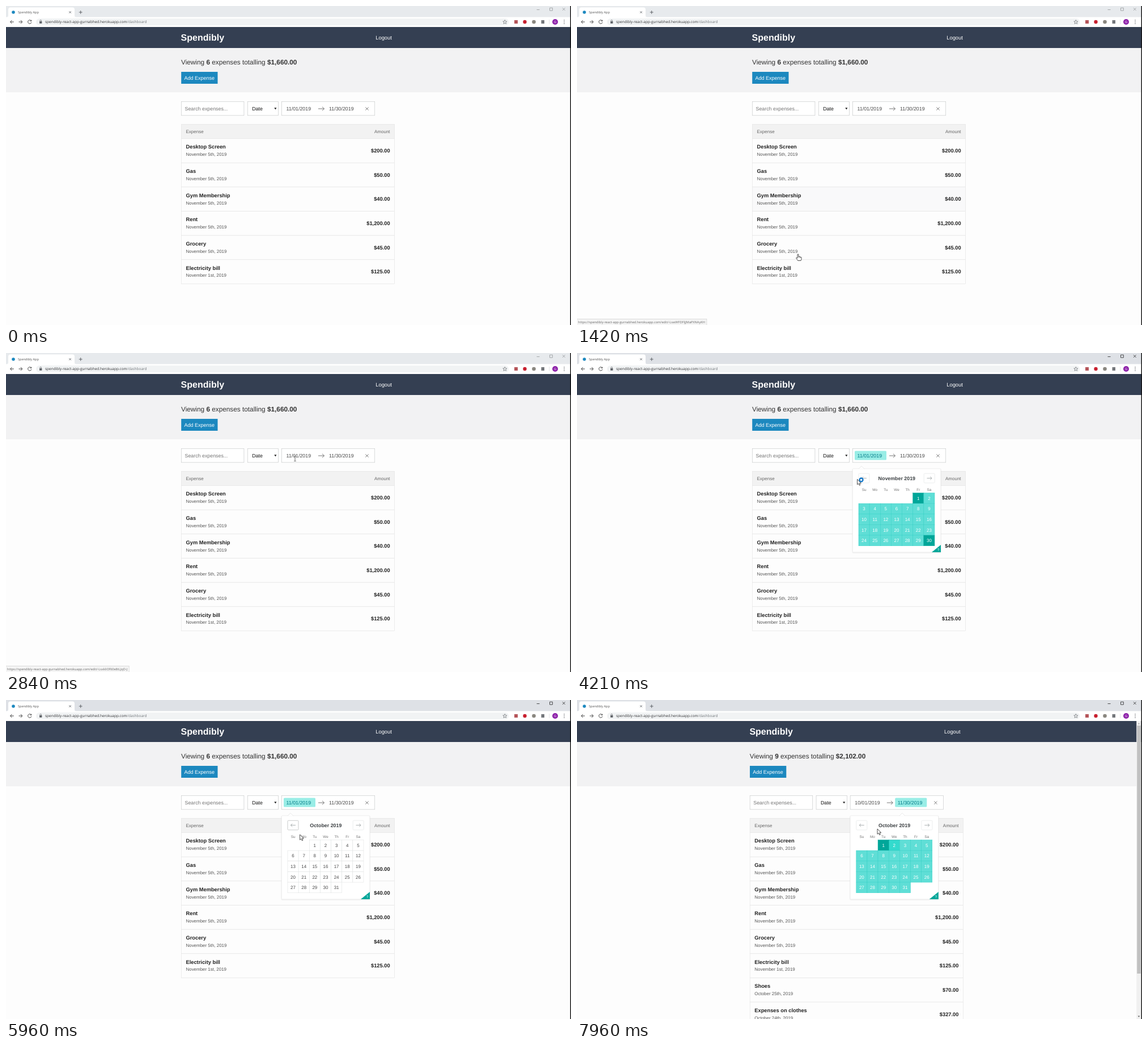
Write an HTML page that moves like this. It is 997 px wide and 562 px high and loops after 8000 ms.

```html
<!DOCTYPE html>
<html lang="en">
<head>
<meta charset="utf-8">
<title>Spendibly App</title>
<style>
html, body { margin: 0; width: 100%; height: 100%; overflow: hidden; background: #fdfdfd; }
svg { display: block; width: 997px; height: 562px; text-rendering: geometricPrecision; }
text { font-family: "Liberation Sans", Arial, sans-serif; white-space: pre; }
.ui { font-family: "Open Sans", "Noto Sans", sans-serif; }
.b { font-weight: bold; }
</style>
</head>
<body>
<svg id="stage" viewBox="0 0 997 562">
  <g id="page"></g>
  <g id="calendar"></g>
  <g id="side"></g>
  <g id="chrome"></g>
  <g id="status"></g>
  <g id="pointer"></g>
</svg>
<script>
const LOOP = 8000;
const OPEN = 3790, SLIDE = 4960, PICK = 7030;
const HOST = 'spendibly-react-app-gurnabhed.herokuapp.com';
const $ = id => document.getElementById(id);

const rect = (x, y, w, h, fill, more = '') =>
  `<rect x="${x}" y="${y}" width="${w}" height="${h}" fill="${fill}" ${more}/>`;
const box = (x, y, w, h, fill, stroke, more = '') =>
  rect(x, y, w, h, fill, `stroke="${stroke}" stroke-width=".7" ${more}`);
const text = (x, y, size, fill, str, more = '') =>
  `<text x="${x}" y="${y}" font-size="${size}" fill="${fill}" ${more}>${str}</text>`;
const line = (d, stroke, width = 1, more = '') =>
  `<path d="${d}" fill="none" stroke="${stroke}" stroke-width="${width}" ${more}/>`;
const dot = (x, y, r, fill, more = '') =>
  `<circle cx="${x}" cy="${y}" r="${r}" fill="${fill}" ${more}/>`;
const END = 'text-anchor="end"', MID = 'text-anchor="middle"', BOLD = 'class="b"';

const rows = [
  ['Desktop Screen', 'November 5th, 2019', '$200.00', 'LsxkliOf60e8tLJqD-J'],
  ['Gas', 'November 5th, 2019', '$50.00', 'LswWzQoLlIYEvskaEUX'],
  ['Gym Membership', 'November 5th, 2019', '$40.00', 'LswWtRkNcJQvdMaPYsE'],
  ['Rent', 'November 5th, 2019', '$1,200.00', 'LswWMbHqKTrXeoZVnAu'],
  ['Grocery', 'November 5th, 2019', '$45.00', 'LswWFDFljJMaPXNAyKH'],
  ['Electricity bill', 'November 1st, 2019', '$125.00', 'LswW7gCvNLsPbRwoXeT'],
  ['Shoes', 'October 25th, 2019', '$70.00'],
  ['Expenses on clothes', 'October 24th, 2019', '$327.00']
];
const ROW_TOP = 233.6, ROW_H = 42.65;
const CELL_X = 497, CELL_Y = 246.5, CELL_W = 19.14, CELL_H = 18.65;

// time, x, y of the pointer's hot spot
const path = [
  [40, 600, 4], [500, 432, 198], [790, 432, 198], [1100, 405, 350], [1300, 394, 420],
  [1420, 390, 437], [1590, 395, 462], [1630, 395, 462], [2140, 487, 290], [2210, 497, 250],
  [2420, 505, 240], [2460, 505, 240], [2840, 510, 186], [3330, 510, 186], [3340, 509, 184],
  [3790, 509, 184], [4210, 494.5, 222.5], [4540, 505, 221], [5420, 505, 221],
  [5960, 518.5, 237], [6210, 544, 255], [7000, 544, 255], [7790, 588, 272],
  [7840, 588, 272], [7960, 530, 227], [8000, 530, 227]
];

function pointerAt(t) {
  if (t < path[0][0]) return null;
  const i = path.findIndex(k => k[0] > t);
  const [t0, x0, y0] = path[i - 1], [t1, x1, y1] = path[i];
  const k = (t - t0) / (t1 - t0);
  return [x0 + (x1 - x0) * k, y0 + (y1 - y0) * k];
}

function rowAt(t) {
  const p = t < OPEN && pointerAt(t);
  if (!p || p[0] < 309 || p[0] > 686) return -1;
  const i = Math.floor((p[1] - ROW_TOP) / ROW_H);
  return i >= 0 && i < 6 ? i : -1;
}

function cellAt(p, dx) {
  if (!p) return -1;
  const c = Math.floor((p[0] - dx - CELL_X) / CELL_W);
  const r = Math.floor((p[1] - CELL_Y) / CELL_H);
  return c >= 0 && c < 7 && r >= 0 && r < 5 ? r * 7 + c : -1;
}

function drawChrome(focused) {
  const ink = focused ? '#222' : '#949698', icon = '#5f6368';
  $('chrome').innerHTML =
    rect(0, 0, 997, 20, focused ? '#dee1e6' : '#e7eaed') +
    '<path d="M1 20Q4 20 4 16V6Q4 2.500 8 2.500H117Q121 2.500 121 6V16Q121 20 124 20Z" fill="#fff"/>' +
    rect(0, 19.5, 997, 17.5, '#fff') +
    dot(13, 11, 2.8, '#1c88bf') +
    text(21, 13, 5.5, '#555', 'Spendibly App', 'class="ui"') +
    line('M111.300 9.200l3.600 3.600m0-3.600l-3.600 3.600', icon, .8) +
    line('M128.800 11h5.800m-2.900-2.900v5.800', icon, 1) +
    line('M936.500 6.500h5', ink, .8) + line('M959.500 3.300h4.800v4.800h-4.800z', ink, .8) +
    line('M982 3.300l4.600 4.600m0-4.600l-4.600 4.600', ink, .8) +
    line('M13.800 28H7.500m3-3l-3 3l3 3M22.500 28h6.300m-3-3l3 3l-3 3', '#444', 1) +
    line('M44.300 25.900a3.200 3.200 0 1 0 .6 2.900m-.1-4.200v2h-2', '#444', 1) +
    rect(53, 22, 834, 12.3, '#f1f3f4', 'rx="6.100"') +
    rect(59, 27, 4.4, 3.7, icon, 'rx=".5"') +
    line('M59.900 27v-1.100a1.300 1.300 0 0 1 2.600 0v1.100', icon, .7) +
    text(69, 30.4, 6.47, '#303134', HOST + '<tspan fill="#70757a">/dashboard</tspan>', 'class="ui"') +
    line('M880.300 24.600l1 2.300 2.500.2-1.900 1.700.6 2.500-2.200-1.400-2.200 1.400.6-2.500-1.900-1.700 2.500-.2z', icon, .7) +
    rect(897, 25, 6, 6, '#b5555a') + dot(915.5, 28, 3.2, '#c8202f') +
    dot(931.5, 28, 3.3, '#8a8780') + rect(944.5, 25, 5.5, 6, '#74777b') +
    line('M958.700 24v8', '#d5d7da', .7) +
    dot(969, 28, 5, '#8e24aa') + text(969, 29.9, 5.3, '#fff', 'G', MID) +
    [25, 28, 31].map(y => dot(985, y, .8, icon)).join('') +
    rect(995.6, 0, 1.4, 562, '#111');
}

function drawPage(t, dx) {
  const picked = t >= PICK, open = t >= OPEN;
  const hot = rowAt(t - 300);
  const shown = rows.slice(0, picked ? 8 : 6);
  const input = (x, on, str) =>
    (on ? rect(x - 4.5, 172.500, 56, 16, '#99ede6', 'rx="1.500"') : '') +
    text(x, 183.6, 8.85, on ? '#007a87' : '#484848', str);
  const list = shown.map(([name, date, sum], i) => {
    const y = ROW_TOP + i * ROW_H;
    return box(309.4, y, 376.2, ROW_H, i === hot ? '#f9f9fa' : '#fdfdfd', '#e5e5e5') +
      text(317.5, y + 17.8, 9.3, '#222', name, BOLD) +
      text(317.5, y + 30.6, 7.95, '#555', date) +
      text(677.6, y + 24.5, 9.3, '#222', sum, BOLD + ' ' + END);
  }).join('');
  $('page').innerHTML =
    rect(0, 37, 997, 525, '#fdfdfd') + rect(0, 37, 997, 37, '#343f52') +
    rect(0, 74, 997, 78, '#f2f2f3') +
    `<g transform="translate(${dx})">` +
    text(308.6, 61, 16, '#fff', 'Spendibly', BOLD) +
    text(652.3, 59, 9.3, '#fff', 'Logout') +
    text(309, 103, 11.8, '#333', `Viewing <tspan class="b">${picked ? 9 : 6}</tspan> expenses totalling ` +
      `<tspan class="b">${picked ? '$2,102.00' : '$1,660.00'}</tspan>`) +
    rect(309.2, 116, 64.3, 21, '#1c88bf') +
    text(341.2, 129.6, 9, '#fff', 'Add Expense', MID) +
    box(309.4, 168.3, 110.5, 24.5, '#fff', '#cacccd') +
    text(315.5, 183.6, 8.85, '#757575', 'Search expenses...') +
    box(426.3, 168.3, 54.3, 24.5, '#fff', '#cacccd') +
    text(434.2, 183.6, 8.85, '#111', 'Date') +
    '<path d="M473.300 179.300h4.200l-2.100 3.200z" fill="#222"/>' +
    box(486.4, 168.3, 164.3, 24.5, '#fff', '#cacccd') +
    input(494.5, open && !picked, picked ? '10/01/2019' : '11/01/2019') +
    input(570, picked, '11/30/2019') +
    line('M551 181h10.500m-3.500-3.300l3.500 3.300l-3.500 3.300', '#555', .8) +
    line('M634.300 178.300l5.400 5.400m0-5.400l-5.400 5.400', '#777', .9) +
    box(309.4, 208.4, 376.2, 25.2, '#f2f2f2', '#e5e5e5') +
    text(317.5, 223.7, 8, '#666', 'Expense') +
    text(677.6, 223.7, 8, '#666', 'Amount', END) + list + '</g>';
  $('side').innerHTML = picked
    ? rect(987.2, 37, 8.4, 525, '#f1f1f1') + rect(988.2, 45, 6.6, 437, '#c1c1c1') +
      '<path d="M989.600 42.500h3.600l-1.800-2.200z" fill="#a3a3a3"/><path d="M989.600 556.500h3.600l-1.800 2.200z" fill="#555"/>'
    : '';
}

function month(name, first, days, style) {
  let out = text(564.3, 224.1, 8.85, '#3c4043', name, BOLD + ' ' + MID);
  for (let d = 1; d <= days; d++) {
    const n = first + d - 1;
    const x = CELL_X + (n % 7) * CELL_W, y = CELL_Y + Math.floor(n / 7) * CELL_H;
    const [fill, edge, ink] = style(d, n);
    out += rect(x, y, CELL_W, CELL_H, fill, `stroke="${edge}" stroke-width=".5"`) +
      text(x + CELL_W / 2, y + 12.1, 8, ink, d, MID);
  }
  return out;
}

function drawCalendar(t, dx) {
  if (t < OPEN) { $('calendar').innerHTML = ''; return; }
  const picked = t >= PICK;
  const hover = cellAt(pointerAt(t - 70), dx);
  const span = ['#5fded6', '#33d0c5', '#fff'], ends = ['#00a699', '#00a699', '#fff'];
  const november = () => month('November 2019', 5, 30, d => d === 1 || d === 30 ? ends : span);
  const october = () => month('October 2019', 2, 31, (d, n) => {
    if (!picked) return [n === hover ? '#e4e7e7' : '#fff', '#dcdfdf', '#484848'];
    if (d === 1) return ends;
    return n === hover ? ['#33dacd', '#00a699', '#fff'] : span;
  });
  const k = Math.min(1, Math.max(0, (t - SLIDE) / 200));
  const ease = k * k * (3 - 2 * k);
  const panel = (shift, body) => `<g transform="translate(${shift})">${body}</g>`;
  const fang = picked ? 578 : 502;
  const nav = (x, d, edge, ink) => box(x, 212.3, 19, 16.6, '#fff', edge, 'rx="1.500"') + line(d, ink, .8);
  const pressed = t >= 4540 && !picked;
  const week = ['Su', 'Mo', 'Tu', 'We', 'Th', 'Fr', 'Sa'];
  $('calendar').innerHTML =
    '<defs><clipPath id="view"><rect x="487" y="205" width="155" height="146"/></clipPath></defs>' +
    `<g transform="translate(${dx})">` +
    rect(485.3, 204, 157.6, 149, '#000', 'opacity=".04" rx="2"') +
    box(486.2, 203.8, 155.8, 147.2, '#fff', '#e6e6e6', 'rx="1.500"') +
    `<path d="M${fang - 5} 204.200l5-5l5 5" fill="#fff" stroke="#dbdbdb" stroke-width=".6"/>` +
    '<g clip-path="url(#view)">' +
    (k < 1 ? panel(147 * ease, november()) : '') +
    (k > 0 ? panel(147 * (ease - 1), october()) : '') + '</g>' +
    week.map((w, i) => text(CELL_X + (i + .5) * CELL_W, 243, 6.4, '#757575', w, MID)).join('') +
    nav(497, 'M511 220.600h-8.600m2.900-2.800l-2.900 2.800l2.900 2.800', pressed ? '#b4b7b7' : '#e4e7e7', '#979d9f') +
    nav(612.2, 'M617.500 220.600h8.600m-2.900-2.800l2.900 2.800l-2.900 2.800', '#e4e7e7', '#979d9f') +
    '<path d="M642 338v13h-16z" fill="#00a699"/>' +
    text(637.6, 349, 6.5, '#fff', '?', MID) + '</g>';
}

function drawStatus(t) {
  let row = -1;
  for (let back = 60; back <= 560 && row < 0; back += 20) row = rowAt(t - back);
  const g = $('status');
  if (row < 0 || t > 3060) { g.innerHTML = ''; return; }
  g.innerHTML = box(-1, 551.4, 0, 12, '#f5f5f5', '#cfcfcf') +
    text(2, 559, 5.65, '#6a6a6a', `https://${HOST}/edit/-${rows[row][3]}`, 'class="ui"');
  g.firstChild.setAttribute('width', g.lastChild.getComputedTextLength() + 6);
}

const ARROW = '<path d="M0 0V9.300L2.200 7.400L3.700 10.700L5.300 10L3.900 6.800H6.700Z" fill="#fff" stroke="#222" stroke-width=".8"/>';
const HAND = '<path d="M-1 .9Q-1 0 0 0T1 .9V4.200Q2.600 3.600 2.900 4.700Q4.300 4.200 4.600 5.300Q6 5 6 6.400V8.400Q6 9.600 5 11.400H-.4Q-1.400 9.400-3.200 7.300Q-3.600 6.300-2.600 6.100Q-1.900 6.100-1 7.200Z" fill="#fff" stroke="#222" stroke-width=".8"/>' +
  line('M1 4.200v2m1.900-1.500v1.700m1.700-1.100v1.300', '#222', .6);
const BEAM = line('M-1.700-4.500H-.5L0-4L.5-4.500H1.700M0-4V4M-1.700 4.500H-.5L0 4L.5 4.500H1.700', '#444', .8);

function drawPointer(t, dx) {
  const p = pointerAt(t);
  if (!p) { $('pointer').innerHTML = ''; return; }
  const x = p[0] - dx, y = p[1];
  const within = (a, b, c, d) => x > a && x < c && y > b && y < d;
  const busy = t > 3900 && t < 4450;
  let shape = ARROW;
  if (busy) {
    shape += dot(7, 1, 3, '#fff', 'stroke="#1879c9" stroke-width="2.300"');
  } else if (within(309, 168, 420, 193) || within(490, 168, 547, 193) || within(566, 168, 620, 193)) {
    shape = BEAM;
  } else if (rowAt(t) >= 0) {
    shape = HAND;
  } else if (t >= OPEN && (cellAt(p, dx) >= 0 || within(497, 212, 516, 229))) {
    shape = HAND;
  }
  $('pointer').innerHTML = `<g transform="translate(${p[0]} ${y})">${shape}</g>`;
}

function draw(t) {
  const dx = t >= PICK ? -4.2 : 0;
  drawPage(t, dx);
  drawCalendar(t, dx);
  drawChrome(t >= OPEN);
  drawStatus(t);
  drawPointer(t, dx);
}

const start = performance.now();
function tick(now) {
  draw(Math.max(0, now - start) % LOOP);
  requestAnimationFrame(tick);
}
draw(0);
requestAnimationFrame(tick);
</script>
</body>
</html>
```
